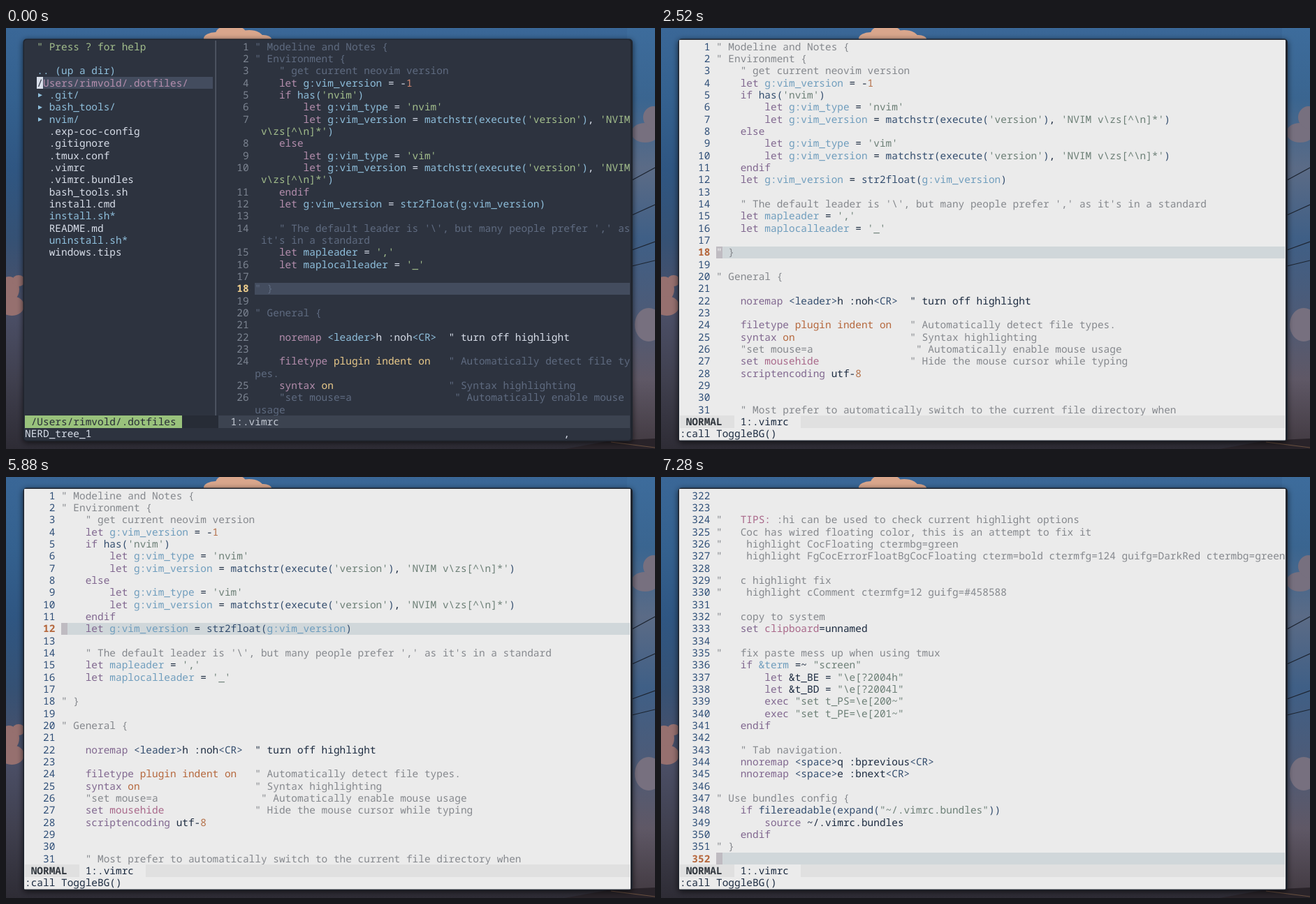
An HTML page with a canvas for the animation above (8 s loop, 929 by 603 pixels).

```html
<!DOCTYPE html>
<html lang="en">
<head>
<meta charset="utf-8">
<title>Editor theme toggle</title>
<style>
html, body { margin: 0; width: 100%; height: 100%; overflow: hidden; background: #2d4a70; }
canvas { display: block; width: 929px; height: 603px; }
</style>
</head>
<body>
<canvas id="stage"></canvas>
<script>
const W = 929, H = 603, LOOP = 8000;
const X0 = 27, Y0 = 18, CW = 8.665, RH = 17.333, COLS = 100;
const STATUS = 31, CMD = 32;
const FONT = '14.44px "Noto Sans Mono", "DejaVu Sans Mono", monospace';

const dark = {
  bg: '#2d333f', fg: '#d8dee9', num: '#7c8491', cur: '#ebcb8b', line: '#434c5e', block: '#d8dee9', blockText: '#2d333f',
  comment: '#5f6b80', key: '#b48ead', name: '#8fbfdc', fn: '#8fbfdc', str: '#a3be8c', digit: '#d08770',
  opt: '#c895bf', on: '#ebcb8b', bar: '#272c36', tab: '#2d333f', mode: '#99c27c', modeText: '#272c36'
};
const light = {
  bg: '#ebebeb', fg: '#1c2b40', num: '#2f4f78', cur: '#b5673c', line: '#d0d7da', block: '#bfbbc1', blockText: '#f4f4f4',
  comment: '#85888d', key: '#80678f', name: '#6f9dbd', fn: '#334d6e', str: '#6c7f76', digit: '#b5734c',
  opt: '#a9688a', on: '#b5673c', bar: '#e0e0e0', tab: '#ebebeb', mode: '#e0e0e0', modeText: '#30363d'
};

const head = String.raw`" Modeline and Notes {
" Environment {
    " get current neovim version
    let g:vim_version = -1
    if has('nvim')
        let g:vim_type = 'nvim'
        let g:vim_version = matchstr(execute('version'), 'NVIM v\zs[^\n]*')
    else
        let g:vim_type = 'vim'
        let g:vim_version = matchstr(execute('version'), 'NVIM v\zs[^\n]*')
    endif
    let g:vim_version = str2float(g:vim_version)

    " The default leader is '\', but many people prefer ',' as it's in a standard
    let mapleader = ','
    let maplocalleader = '_'

" }

" General {

    noremap <leader>h :noh<CR>  " turn off highlight

    filetype plugin indent on   " Automatically detect file types.
    syntax on                   " Syntax highlighting
    "set mouse=a                 " Automatically enable mouse usage
    set mousehide               " Hide the mouse cursor while typing
    scriptencoding utf-8


    " Most prefer to automatically switch to the current file directory when`.split('\n');

const tail = String.raw`

"   TIPS: :hi can be used to check current highlight options
"   Coc has wired floating color, this is an attempt to fix it
"    highlight CocFloating ctermbg=green
"    highlight FgCocErrorFloatBgCocFloating cterm=bold ctermfg=124 guifg=DarkRed ctermbg=green

"   c highlight fix
"    highlight cComment ctermfg=12 guifg=#458588

"   copy to system
    set clipboard=unnamed

"   fix paste mess up when using tmux
    if &term =~ "screen"
        let &t_BE = "\e[?2004h"
        let &t_BD = "\e[?2004l"
        exec "set t_PS=\e[200~"
        exec "set t_PE=\e[201~"
    endif

    " Tab navigation.
    nnoremap <space>q :bprevious<CR>
    nnoremap <space>e :bnext<CR>

" Use bundles config {
    if filereadable(expand("~/.vimrc.bundles"))
        source ~/.vimrc.bundles
    endif
" }
`.split('\n');

const files = ['.exp-coc-config', '.gitignore', '.tmux.conf', '.vimrc', '.vimrc.bundles', 'bash_tools.sh',
  'install.cmd', 'install.sh*', 'README.md', 'uninstall.sh*', 'windows.tips'];
const home = '/Users/rimvold/.dotfiles';

const syntax = [
  ['opt', /^(?<="\s+)TIPS:|^\b(mousehide|clipboard)\b/],
  ['key', /^(let|if|else|endif|n?noremap|filetype|syntax|set|scriptencoding|exec|source)\b/],
  ['on', /^(plugin|indent|on)\b/],
  ['name', /^(g:\w+|map(local)?leader|&term)/],
  ['fn', /^(<\w+>|(has|matchstr|execute|str2float|filereadable|expand)\b|[()])/],
  ['str', /^('[^']*'|"[^" ][^"]*")/],
  ['digit', /^\d+/],
  ['comment', /^" .*/],
  ['fg', /^([:.~&]*\w+|\s+|.)/]
];

// Splits a line into [style, text] pairs.
function tokens(text) {
  if (/^\s*"/.test(text)) {
    const tip = text.match(/^("\s+)(TIPS:)(.*)/);
    return tip ? [['comment', tip[1]], ['opt', tip[2]], ['comment', tip[3]]] : [['comment', text]];
  }
  const out = [];
  const plainNote = /^\s*noremap/.test(text);
  while (text) {
    for (const [style, rule] of syntax) {
      const hit = text.match(rule);
      if (!hit) continue;
      out.push([plainNote && style === 'comment' ? 'fg' : style, hit[0]]);
      text = text.slice(hit[0].length);
      break;
    }
  }
  return out;
}

const canvas = document.getElementById('stage');
const ctx = canvas.getContext('2d');
const dpr = window.devicePixelRatio || 1;
canvas.width = W * dpr;
canvas.height = H * dpr;
ctx.scale(dpr, dpr);

let theme = dark;

const cellX = col => X0 + col * CW;
const rowY = row => Y0 + row * RH;

function fill(row, from, to, color) {
  const x = Math.round(cellX(from)), y = Math.round(rowY(row));
  ctx.fillStyle = color;
  ctx.fillRect(x, y, Math.round(cellX(to)) - x, Math.round(rowY(row + 1)) - y);
}

function put(row, col, text, color, bold) {
  ctx.font = (bold ? 'bold ' : '') + FONT;
  ctx.fillStyle = color;
  [...text].forEach((ch, i) => {
    if (ch !== ' ') ctx.fillText(ch, cellX(col + i), rowY(row) + 13.8);
  });
}

function block(row, col, ch) {
  fill(row, col, col + 1, theme.block);
  put(row, col, ch, theme.blockText);
}

function buffer(lines, first, left, current, cursor) {
  const textCol = left + 6, width = COLS - textCol;
  let row = 0;
  lines.forEach((text, i) => {
    if (row >= STATUS) return;
    const n = first + i, active = n === current, label = String(n);
    if (active) fill(row, textCol, COLS, theme.line);
    put(row, left + 5 - label.length, label, active ? theme.cur : theme.num, active);
    let at = 0;
    for (const [style, part] of tokens(text))
      for (const ch of part) {
        put(row + Math.floor(at / width), textCol + at % width, ch, theme[style]);
        at++;
      }
    if (active && cursor) block(row, textCol, text[0] || ' ');
    row += Math.max(1, Math.ceil(text.length / width));
  });
}

function tree() {
  put(0, 2, '" Press ? for help', theme.str);
  put(2, 2, '.. (up a dir)', theme.name);
  fill(3, 2, 31, theme.line);
  put(3, 2, home + '/', theme.key);
  block(3, 2, '/');
  ['.git/', 'bash_tools/', 'nvim/'].forEach((dir, i) => {
    const y = rowY(4 + i) + 9;
    ctx.fillStyle = theme.name;
    ctx.beginPath();
    ctx.moveTo(46, y - 3);
    ctx.lineTo(52, y);
    ctx.lineTo(46, y + 3);
    ctx.fill();
    put(4 + i, 4, dir, theme.name);
  });
  files.forEach((f, i) => put(7 + i, 4, f, f.endsWith('*') ? theme.name : theme.fg));
  ctx.fillStyle = '#5c6370';
  ctx.fillRect(299.5, Y0, 1.3, STATUS * RH);
  fill(STATUS, 0, COLS, theme.bar);
  fill(STATUS, 0, 26, theme.mode);
  put(STATUS, 1, home, theme.modeText);
  fill(STATUS, 32, COLS, '#3c4350');
  put(STATUS, 34, '1:.vimrc', '#c3c9d3');
}

function statusBar(mode) {
  const tab = mode === 'COMMAND' ? 10 : 9;
  fill(STATUS, 0, COLS, theme.bar);
  fill(STATUS, 0, 9, theme.mode);
  fill(STATUS, tab, tab + 11, theme.tab);
  put(STATUS, 1, mode, theme.modeText, true);
  put(STATUS, tab + 1, '1:.vimrc', theme.fg, theme === dark);
}

function gradient(x1, y1, stops) {
  const g = ctx.createLinearGradient(0, 0, x1, y1);
  stops.forEach((c, i) => g.addColorStop(i / (stops.length - 1), c));
  return g;
}

function puff(x, y, rx, ry, color) {
  ctx.fillStyle = color;
  ctx.beginPath();
  ctx.ellipse(x, y, rx, ry, 0, 0, 7);
  ctx.fill();
}

function sky() {
  ctx.fillStyle = gradient(0, H, ['#3a6797', '#34618f', '#2f5682', '#355174', '#4c5068', '#40404f', '#2e2c35']);
  ctx.fillRect(0, 0, W, H);
  ctx.fillStyle = gradient(0, H, ['#3d6c9c', '#3a6590', '#5b6b86', '#3f5f86', '#4c5b78', '#5f5866', '#40383f']);
  ctx.fillRect(W - 40, 0, 40, H);
  for (const [x, y, rx, ry] of [[300, 15, 17, 9], [322, 8, 22, 12], [348, 14, 20, 11], [368, 16, 12, 6]])
    puff(x, y, rx, ry, '#d9a68c');
  for (const [x, y, rx, ry] of [[4, 374, 15, 18], [18, 362, 9, 8], [8, 398, 18, 14]])
    puff(x, y, rx, ry, '#96706f');
  for (const [x, y, rx, ry] of [[915, 150, 20, 14], [927, 128, 15, 16], [920, 425, 20, 24]])
    puff(x, y, rx, ry, '#77707f');
  ctx.strokeStyle = '#1d2430';
  ctx.lineWidth = 1.2;
  ctx.beginPath();
  for (const [a, b] of [[218, 200], [268, 253], [318, 306], [341, 333]]) {
    ctx.moveTo(896, a);
    ctx.lineTo(W, b);
  }
  ctx.stroke();
  ctx.fillStyle = '#292329';
  ctx.beginPath();
  ctx.moveTo(800, H);
  ctx.lineTo(866, 591);
  ctx.lineTo(W, 588);
  ctx.lineTo(W, H);
  ctx.fill();
  ctx.strokeStyle = '#69503f';
  ctx.beginPath();
  ctx.moveTo(866, 593);
  ctx.lineTo(W, 601);
  ctx.stroke();
}

function frame() {
  ctx.save();
  ctx.shadowColor = 'rgba(0,0,0,.65)';
  ctx.shadowBlur = 9 * dpr;
  ctx.shadowOffsetY = 2 * dpr;
  ctx.fillStyle = '#20252e';
  ctx.beginPath();
  ctx.roundRect(24.5, 15.5, 872.5, 576.5, 5);
  ctx.fill();
  ctx.restore();
  ctx.fillStyle = theme.bg;
  ctx.beginPath();
  ctx.roundRect(26, 17, 868, 573.5, theme === dark ? 4 : 1);
  ctx.fill();
}

// Held keys move two lines per 70 ms tick.
function cursorLine(t) {
  const tick = start => Math.floor((t - start) / 70);
  if (t < 5460) return 18;
  if (t < 5740) return 17;
  if (t < 6230) return 16 - 2 * Math.min(4, tick(5740));
  if (t < 6510) return 1;
  if (t < 6790) return 2;
  if (t < 7140) return 3 + 2 * Math.min(2, tick(6790));
  return 352;
}

function pendingKeys(t) {
  if (t < 210) return ',';
  if (t >= 1960 && t < 2380) return t < 2240 ? ',' : ',b';
  if (t >= 3640 && t < 4690) return ',';
  return t >= 6160 && t < 6230 ? 'g' : '';
}

function draw(t) {
  const treeOpen = t < 280, command = t >= 2450 && t < 2520;
  theme = t < 2520 ? dark : light;
  ctx.textBaseline = 'alphabetic';
  ctx.textRendering = 'geometricPrecision';
  sky();
  frame();
  const current = cursorLine(t), atEnd = current === 352;
  buffer(atEnd ? tail : head, atEnd ? 322 : 1, treeOpen ? 32 : 0, current, !treeOpen && !command);
  if (treeOpen) tree();
  else statusBar(command ? 'COMMAND' : 'NORMAL');
  if (t < 210) put(CMD, 0, 'NERD_tree_1', theme.fg);
  if (t >= 2380) put(CMD, 0, ':call ToggleBG()', theme.fg);
  if (command) block(CMD, 0, ':');
  put(CMD, 89, pendingKeys(t), theme.fg);
}

const start = performance.now();
function loop(now) {
  draw(Math.max(0, now - start) % LOOP);
  requestAnimationFrame(loop);
}
draw(0);
requestAnimationFrame(loop);
</script>
</body>
</html>
```
